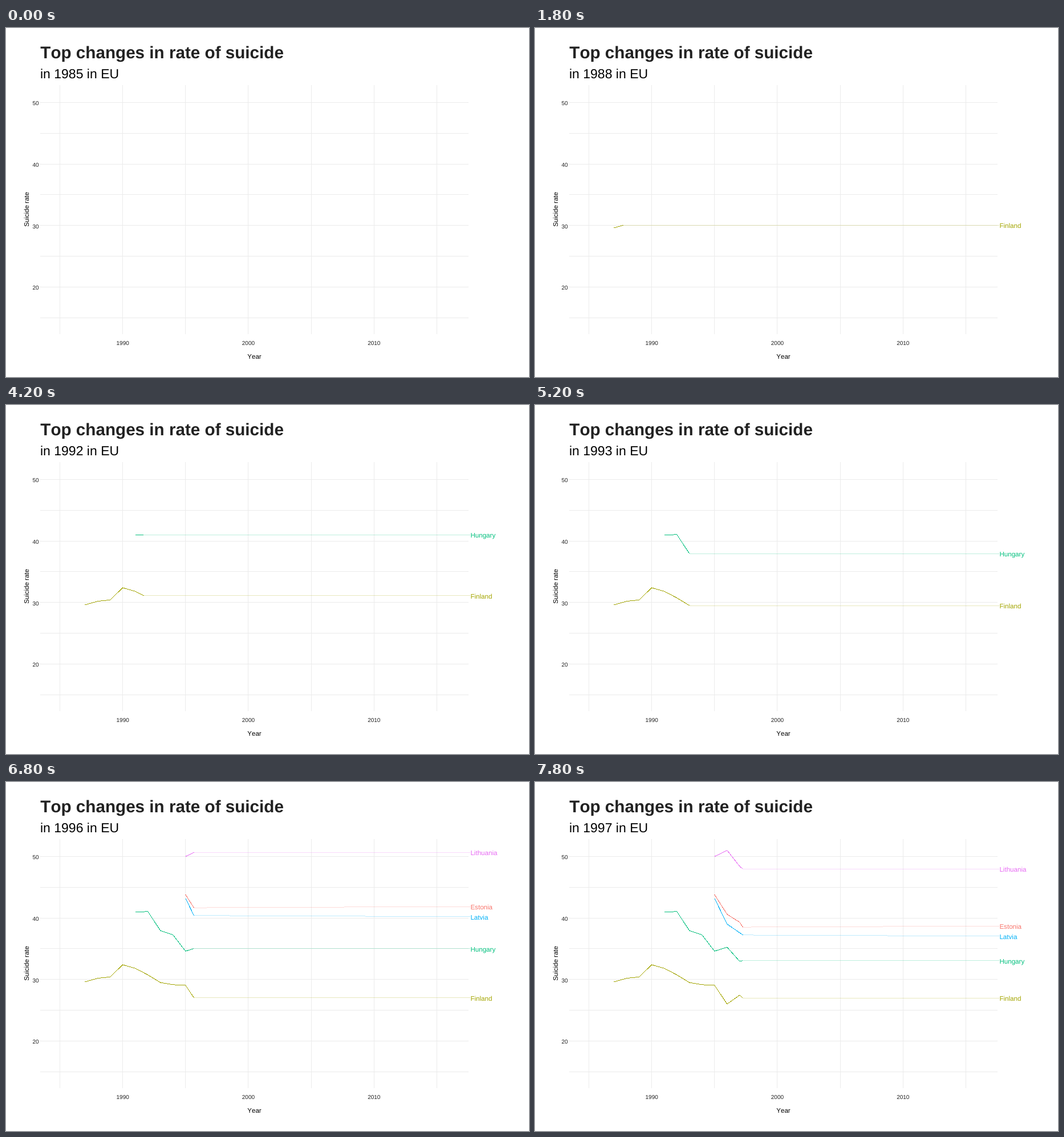
Recreate the animation shown at these times as an HTML page. Size 917 by 611 pixels, loop 8000 ms.

```html
<!DOCTYPE html>
<html lang="en">
<head>
<meta charset="utf-8">
<title>Top changes in rate of suicide</title>
<style>
  html, body { margin: 0; width: 100%; height: 100%; overflow: hidden; background: #fff; }
  svg { display: block; font-family: "Liberation Sans", Arial, sans-serif; font-kerning: none; text-rendering: geometricPrecision; }
  line, polyline { shape-rendering: crispEdges; fill: none; stroke-width: 1; }
  .tick { font-size: 10px; fill: #222; }
  .axis { font-size: 11.5px; text-anchor: middle; }
  .label { font-size: 11.6px; }
</style>
</head>
<body>
<svg id="stage" width="917" height="611" viewBox="0 0 917 611"></svg>
<script>
const LOOP = 8000, STEP = 200, FIRST = 1985, SPAN = 31, STEPS = 99;
const LABEL_X = 814, LABEL_GAP = 17.7;
const stage = document.getElementById("stage");

const series = [
  { name: "Estonia", color: "#F8766D", start: 1995, rates: [43.8, 40.6, 39.3, 36.15] },
  { name: "Finland", color: "#A3A500", start: 1987,
    rates: [29.6, 30.2, 30.4, 32.4, 31.8, 30.75, 29.5, 29.15, 29.05, 26, 27.45, 25.6] },
  { name: "Hungary", color: "#00BF7D", start: 1991,
    rates: [40.95, 41.05, 37.95, 37.25, 34.6, 35.25, 32.95, 33.4] },
  { name: "Latvia", color: "#00B0F6", start: 1995, rates: [43.2, 39, 37.6, 36.1] },
  { name: "Lithuania", color: "#E76BF3", start: 1995, rates: [50, 51, 48.4, 46.7] }
];

const xOf = year => 94.5 + (year - FIRST) * 22.03;
const yOf = rate => 130.4 + (50 - rate) * 10.765;
// Each year is reached on a whole step.
const stepOf = year => Math.round(STEPS * (year - FIRST) / SPAN);

function set(el, attrs) {
  for (const key in attrs) el.setAttribute(key, attrs[key]);
}

function add(tag, attrs, text = "") {
  const el = document.createElementNS("http://www.w3.org/2000/svg", tag);
  set(el, attrs);
  el.textContent = text;
  return stage.appendChild(el);
}

function gridLine(x1, y1, x2, y2) {
  add("line", { x1, y1, x2, y2, stroke: "#EBEBEB" });
}

for (let rate = 15; rate <= 50; rate += 5) {
  const y = yOf(rate);
  gridLine(60, y, 811, y);
  if (rate % 10 === 0) {
    add("text", { class: "tick", x: 57.5, y: Math.round(y + 4.9), "text-anchor": "end" }, rate);
  }
}
for (let year = 1985; year <= 2015; year += 5) {
  const x = xOf(year);
  gridLine(x, 100, x, 536);
  if (year % 10 === 0) {
    add("text", { class: "tick", x, y: 555, "text-anchor": "middle" }, year);
  }
}
add("text", { x: 60.3, y: 53, "font-size": 29.65, "font-weight": "bold", fill: "#222" },
  "Top changes in rate of suicide");
const subtitle = add("text", { x: 60, y: 88, "font-size": 23 });
add("text", { class: "axis", x: 435.5, y: 579 }, "Year");
add("text", { class: "axis", transform: "translate(40 317.5) rotate(-90)" }, "Suicide rate");

for (const s of series) {
  s.lead = add("line", { stroke: s.color, "stroke-opacity": 0.25, x2: LABEL_X });
}
for (const s of series) {
  s.line = add("polyline", { stroke: s.color });
  s.label = add("text", { class: "label", x: 814.4, fill: s.color }, s.name);
}

function yearAt(step) {
  let year = FIRST;
  while (stepOf(year + 1) <= step) year++;
  const from = stepOf(year);
  return year + (step - from) / (stepOf(year + 1) - from);
}

function rateAt(s, year) {
  const pos = year - s.start, i = Math.floor(pos);
  const a = s.rates[i], b = s.rates[i + 1] ?? a;
  return a + (b - a) * (pos - i);
}

// Pushes neighbouring labels apart around their middle.
function spread(list) {
  list.sort((a, b) => a.y - b.y);
  for (const s of list) s.labelY = s.y;
  for (let i = 1; i < list.length; i++) {
    const a = list[i - 1], b = list[i];
    const push = (LABEL_GAP - (b.y - a.y)) / 2;
    if (push > 0) {
      a.labelY -= push;
      b.labelY += push;
    }
  }
}

function draw(time) {
  const step = Math.floor((time % LOOP) / STEP);
  const year = yearAt(step);
  subtitle.textContent = `in ${Math.round(FIRST + SPAN * step / STEPS)} in EU`;

  const shown = [];
  for (const s of series) {
    const on = year >= s.start;
    for (const el of [s.lead, s.line, s.label]) set(el, { display: on ? "inline" : "none" });
    if (!on) continue;
    s.y = yOf(rateAt(s, year));
    shown.push(s);
  }
  spread(shown);

  const x = xOf(year);
  for (const s of shown) {
    const points = [];
    for (let i = 0; s.start + i < year; i++) points.push([xOf(s.start + i), yOf(s.rates[i])]);
    points.push([x, s.y]);
    set(s.line, { points: points.join(" ") });
    set(s.lead, { x1: x, y1: s.y, y2: s.labelY });
    set(s.label, { y: Math.round(s.labelY + 5) });
  }
}

let begin;
function tick(now) {
  begin ??= now;
  draw(now - begin);
  requestAnimationFrame(tick);
}
draw(0);
requestAnimationFrame(tick);
</script>
</body>
</html>
```
